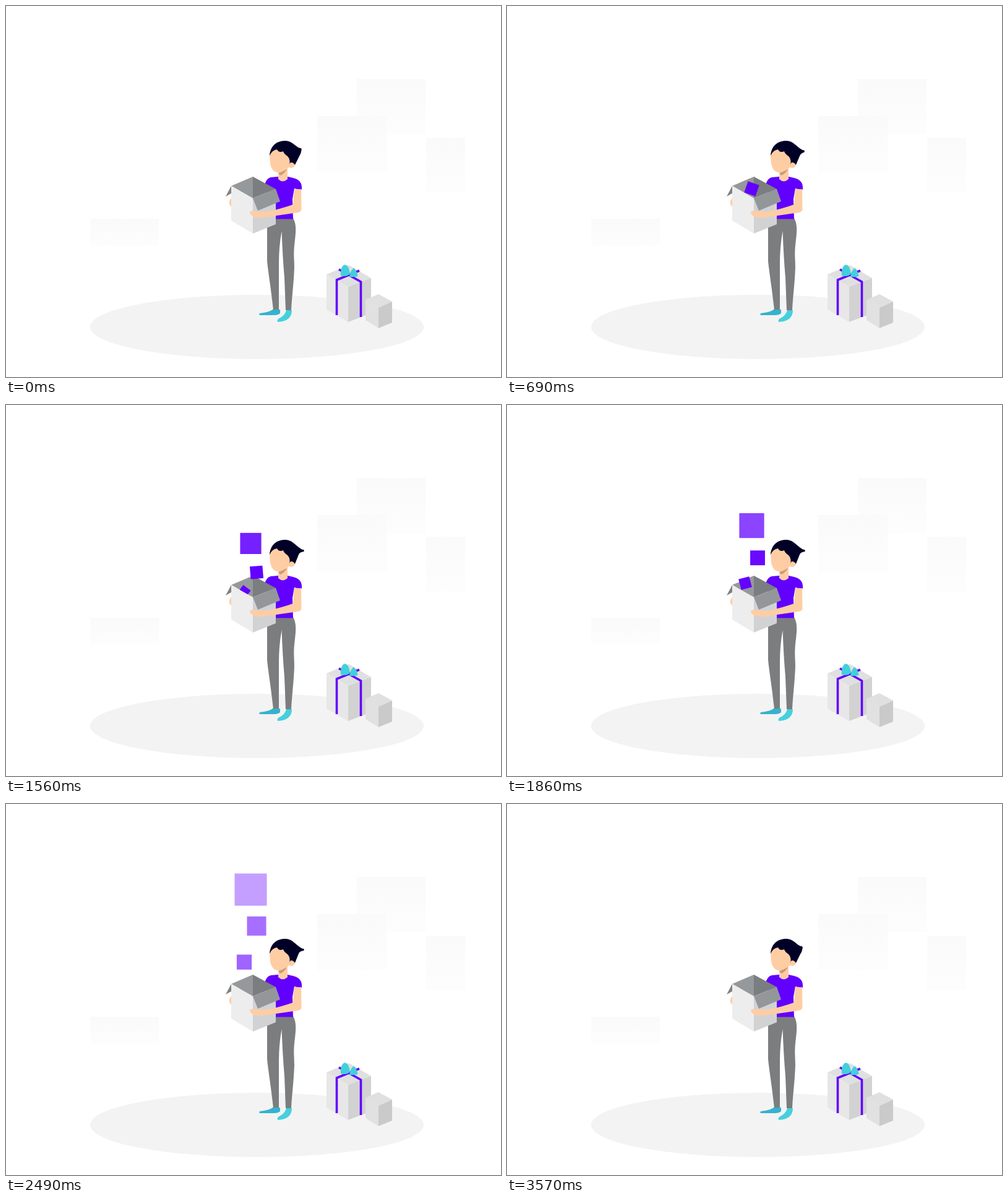
Animation of 800 by 600 pixels, one loop 3.6 s. Source, as an HTML page:

```html
<!DOCTYPE html>
<html lang="en">
<head>
<meta charset="utf-8">
<title>Unboxing</title>
<style>
  html, body { margin: 0; width: 100%; height: 100%; overflow: hidden; background: #fff; }
  svg { display: block; width: 100vw; height: 100vh; }
</style>
</head>
<body>
<svg viewBox="0 0 800 600">
  <defs>
    <linearGradient id="pale" x2="0" y2="1">
      <stop stop-color="#fafafa"/>
      <stop offset="1" stop-color="#fdfdfd"/>
    </linearGradient>
  </defs>

  <!-- backdrop -->
  <g fill="url(#pale)">
    <rect x="567" y="118" width="111" height="89"/>
    <rect x="503" y="178" width="112" height="91"/>
    <rect x="679" y="213" width="63" height="89"/>
    <rect x="136" y="344" width="111" height="43"/>
  </g>
  <ellipse cx="405.5" cy="519" rx="269.5" ry="52" fill="#f3f3f3"/>

  <!-- gift -->
  <path fill="#e0e0e0" d="M518 434L554 419L590 440L553 454Z"/>
  <path fill="#e7e7e7" d="M518 434L553 454V511L518 491Z"/>
  <path fill="#d2d2d2" d="M553 454L590 440V497L553 511Z"/>
  <g fill="none" stroke="#6200ff" stroke-width="3.600">
    <path d="M534.500 500V443L571 428"/>
    <path d="M573.500 503V446L538 426"/>
  </g>
  <path fill="#43cfdc" d="M541 436C540 427 543 420 547 418.500C552 418 555 425 556 433C553 437 546 438 541 436Z"/>
  <path fill="#43cfdc" d="M555 438C556 431 559 425 562 424C566 427 568 432 568.500 437C564 439 559 438 555 438Z"/>

  <!-- small parcel -->
  <path fill="#e0e0e0" d="M581 475L602 466L624 478L602 488Z"/>
  <path fill="#e1e1e1" d="M581 475L602 488V521L581 508Z"/>
  <path fill="#cacaca" d="M602 488L624 478V512L602 521Z"/>

  <!-- person -->
  <path fill="#36b2cd" d="M432 490L443 491V497Q440 500 433 500H411Q408 500 410 497Q428 495 432 490Z"/>
  <path fill="#45d0dc" d="M453 492H462Q462 501 456 506Q449 511 440 511Q437 510 440 506Q451 501 453 492Z"/>
  <path fill="#7b7d7e" d="M422 343H464C469 352 469 362 467 378C464 402 466 406 466 422C465 450 462 470 461 492H452L450 440Q447 405 445.500 364Q441 390 441 415V491H432C428 455 423 425 422 412Z"/>
  <path fill="#ffcda4" d="M365 310Q360 314 361 320Q362 324 366 325Z"/>
  <path fill="#6200ff" d="M418 290Q420 279 428 277L440 276Q447 281 455 276L464 278Q477 281 478 292V297Q472 298 466 295L463 312L464 344.500H422V300Z"/>
  <path fill="#ffcda4" d="M440 262H455V280Q447 287 440 280Z"/>
  <path fill="#c99c78" d="M441 267L454 264Q450 271 444 274L441 272Z"/>
  <path fill="#ffcda4" d="M426 242C427 228 440 226 450 230L460 240L459 254Q464 250 467 255Q468 260 462 262L457 261Q450 267 442 269.500Q430 270 427 255Z"/>
  <path id="hair" fill="#000026"/>

  <!-- open box: inside, contents, front -->
  <path fill="#96999b" d="M364 291L399 276V311Z"/>
  <path fill="#7b7e80" d="M399 276L436 296L399 311Z"/>
  <path fill="#7f8183" d="M364 291L355 308L364 303Z"/>
  <g id="squares" fill="#6200ff"></g>
  <path fill="#ededed" d="M364 291L399 311V368L364 347Z"/>
  <path fill="#d2d2d4" d="M399 311L436 296V353L399 368Z"/>
  <path fill="#94979a" d="M399 311L436 296L443 316L407 331Z"/>
  <path fill="#ffcda4" d="M466 295Q472 297 477 296L477.500 329Q477 333 472 334L416 342Q402 343 399 340Q394 337 394 333Q396 330 402 332L420 333Q445 328 464 321Z"/>
</svg>
<script>
const LOOP = 3600, RISE = 3200, FADED = 3450, SPIN = 0.13;
const hair = document.getElementById('hair');
const holder = document.getElementById('squares');

// start: begins to rise, upright: stops turning, fade: begins to fade (ms)
const squares = [
  { x: 395.5, y: [318, 93.5], size: [14.5, 61.5], start: 150, upright: 1235, fade: 1100 },
  { x: 405, y: [330, 142], size: [12, 39], start: 400, upright: 1597, fade: 1700 },
  { x: 385, y: [322, 199], size: [11, 35.5], start: 800, upright: 1975, fade: 1800 }
];

for (const s of squares) {
  s.el = document.createElementNS('http://www.w3.org/2000/svg', 'rect');
  holder.append(s.el);
}

const lerp = ([a, b], k) => a + (b - a) * k;

// Soft ease in and out between two times.
function ease(t, from, to) {
  const u = Math.max(0, Math.min(1, (t - from) / (to - from)));
  return lerp([u, u * u * (3 - 2 * u)], 0.75);
}

function drawHair(t) {
  const h = Math.min(1, 1.4 * Math.sin(Math.PI * t / LOOP));
  const x = 478 + 4 * h, y = 231 + 4 * h;
  hair.setAttribute('d',
    `M426 242C427 226 438 217 453 218C463 219 466 226 ${x - 4} ${y - 1.5}` +
    `Q${x + 0.5} ${y - 1.5} ${x - 0.5} ${y + 2}` +
    `Q${477 - 3 * h} ${239 - h} ${474 - h} ${243 - h}L467 257Q463 251 459 254` +
    'L458 257Q460 248 455 243Q449 239 448 235Q441 238 438 232Q430 233 426 242Z');
}

function drawSquare(s, t) {
  const k = ease(t, s.start, s.start + RISE);
  const size = lerp(s.size, k);
  const turn = Math.min(0, (t - s.upright) * SPIN);
  const attrs = {
    x: -size / 2, y: -size / 2, width: size, height: size,
    transform: `translate(${s.x} ${lerp(s.y, k)}) rotate(${turn})`,
    opacity: 1 - ease(t, s.fade, FADED)
  };
  for (const name in attrs) s.el.setAttribute(name, attrs[name]);
}

const start = performance.now();
function tick() {
  const t = (performance.now() - start) % LOOP;
  drawHair(t);
  for (const s of squares) drawSquare(s, t);
  requestAnimationFrame(tick);
}
tick();
</script>
</body>
</html>
```
